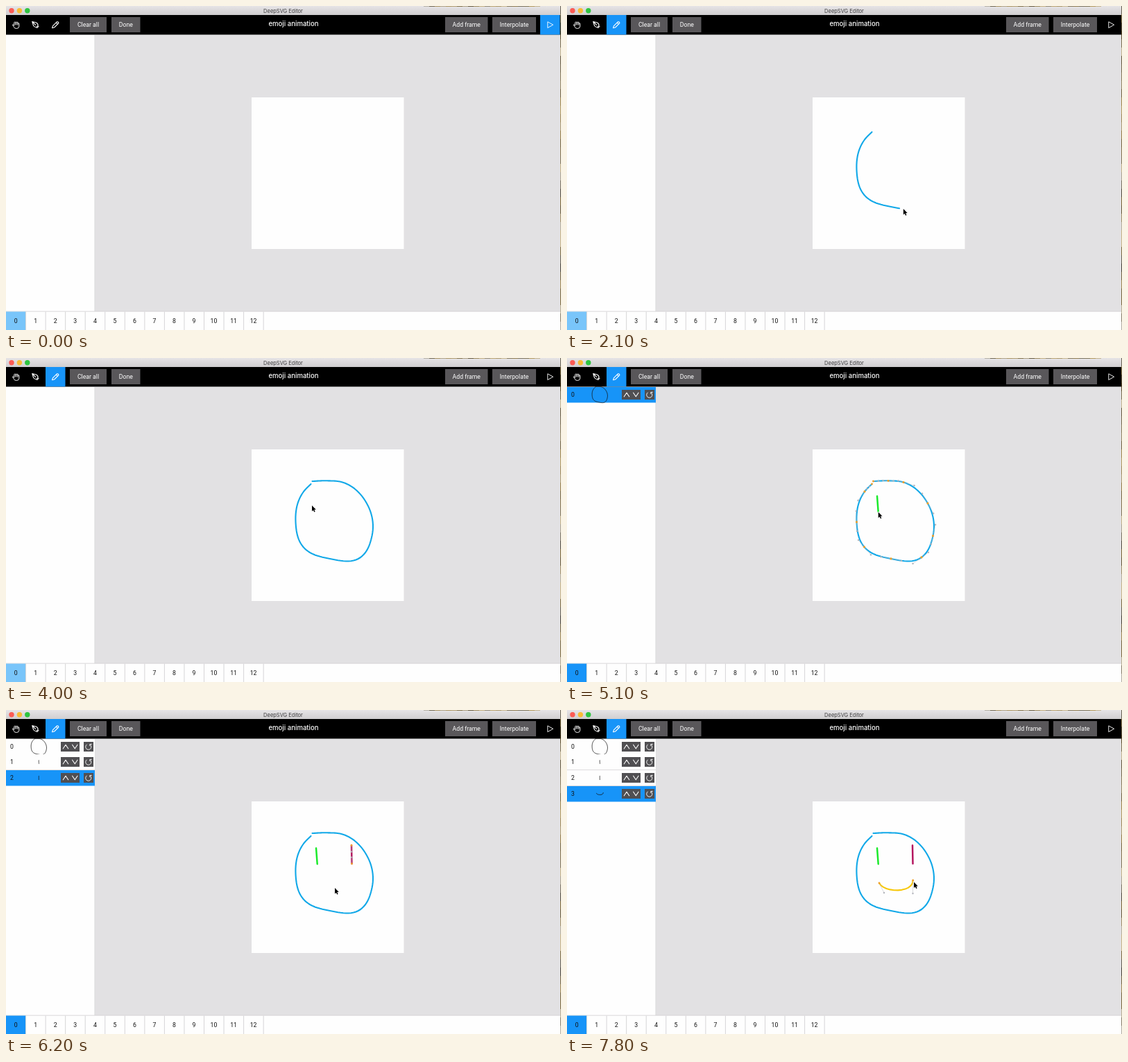
An HTML page with a canvas that plays this animation: 800x468 px, repeating every 8 s.

```html
<!DOCTYPE html>
<html lang="en">
<head>
<meta charset="utf-8">
<title>DeepSVG Editor</title>
<style>
html, body { margin: 0; width: 100%; height: 100%; overflow: hidden; background: #e2e1e3; }
canvas { display: block; width: 800px; height: 468px; }
</style>
</head>
<body>
<canvas id="stage"></canvas>
<script>
const LOOP = 8000, STEP = 100, LAST = 7800;
const BLUE = '#1794f8', ORANGE = '#f0a02c', HANDLE = '#b3b5bb', PAPER = '#fefefe', RULE = '#d6d5d7';
const UI = '8.7px Roboto, sans-serif';
const canvas = document.getElementById('stage');
const c = canvas.getContext('2d');
const dpr = window.devicePixelRatio || 1;
canvas.width = 800 * dpr;
canvas.height = 468 * dpr;

const mix = (p, q, f) => p.map((v, k) => v + (q[k] - v) * f);
const dist = (p, q) => Math.hypot(q[0] - p[0], q[1] - p[1]);
const clamp = f => Math.min(1, Math.max(0, f));

// Cubic segments through points; the nearer neighbour steers the tangent more
function spline(pts) {
  const dir = pts.map((p, i) => {
    const a = pts[i - 1] || p, b = pts[i + 1] || p;
    const la = dist(a, p) || 1, lb = dist(p, b) || 1;
    const v = [0, 1].map(k => (p[k] - a[k]) / la * lb + (b[k] - p[k]) / lb * la);
    return v.map(n => n / Math.hypot(...v));
  });
  return pts.slice(1).map((q, i) => {
    const p = pts[i], k = dist(p, q) * 0.35;
    return [p, p.map((v, n) => v + dir[i][n] * k), q.map((v, n) => v - dir[i + 1][n] * k), q];
  });
}

function sample(segs) {
  const out = [segs[0][0]];
  for (const [p, a, b, q] of segs) {
    for (let i = 1; i <= 12; i++) {
      const t = i / 12, m = mix(a, b, t);
      out.push(mix(mix(mix(p, a, t), m, t), mix(m, mix(b, q, t), t), t));
    }
  }
  return out;
}

// Leading part of a polyline, by share of its length
function part(pts, share) {
  const len = pts.slice(1).map((p, i) => dist(pts[i], p));
  let left = clamp(share) * len.reduce((a, b) => a + b, 0);
  const out = [pts[0]];
  for (let i = 0; i < len.length && left > 0; i++) {
    out.push(mix(pts[i], pts[i + 1], Math.min(1, left / len[i])));
    left -= len[i];
  }
  return out;
}

const face = spline([
  [439.5, 182], [429, 193], [417.5, 237], [428.5, 273], [467, 290], [511, 288],
  [527.5, 257], [520, 210], [485, 179.5], [463, 177.3], [441.5, 178]]);
const smile = [[[450, 250], [457, 264], [498.5, 265], [498.7, 246]]];

// Strokes are drawn from start to end and join the list when done
const shapes = [
  { segs: face, color: '#11a8e8', width: 2.1, start: 1500, end: 3300, done: 4400, ease: 1.37 },
  { segs: spline([[447, 199.5], [448.7, 222.5]]), color: '#1bea2b', width: 2.5, start: 4800, end: 5100, done: 5500, ease: 1 },
  { segs: spline([[498, 195.5], [498.5, 222]]), color: '#b4165f', width: 2.5, start: 5600, end: 5900, done: 6100, ease: 1 },
  { segs: smile, color: '#f7c80c', width: 2.1, start: 6600, end: 7300, done: 7500, ease: 1 }
];
for (const s of shapes) {
  s.pts = sample(s.segs);
  s.share = t => 1 - Math.pow(1 - clamp((t - s.start) / (s.end - s.start)), s.ease);
  s.mid = [0, 1].map(k => {
    const v = s.pts.map(p => p[k]);
    return (Math.min(...v) + Math.max(...v)) / 2;
  });
}

// Pointer rests between strokes: time and place
const stops = [[300, [74, 29]], [700, [483, 187]], [4000, [441, 213]], [6200, [474, 257]], [LAST, [500, 248.5]]];
for (const s of shapes) stops.push([s.start, s.pts[0]], [s.end, s.pts[s.pts.length - 1]]);
stops.sort((a, b) => a[0] - b[0]);

function pointer(t) {
  const pen = shapes.find(s => t >= s.start && t <= s.end);
  if (pen) return part(pen.pts, pen.share(t) + .016).pop();
  const i = stops.findIndex(s => s[0] >= t), [t1, q] = stops[i];
  if (!i) return q;
  const [t0, p] = stops[i - 1];
  return mix(p, q, (t - t0) / (t1 - t0));
}

function rect(x, y, w, h, color) {
  c.fillStyle = color;
  c.fillRect(x, y, w, h);
}

function dot([x, y], r, color) {
  c.fillStyle = color;
  c.beginPath();
  c.arc(x, y, r, 0, 7);
  c.fill();
}

function text(s, x, y, font, color, align = 'center') {
  c.font = font;
  c.fillStyle = color;
  c.textAlign = align;
  c.fillText(s, x, y);
}

function line(pts, color, width) {
  c.strokeStyle = color;
  c.lineWidth = width;
  c.beginPath();
  pts.forEach(p => c.lineTo(p[0], p[1]));
  c.stroke();
}

function icon(d, x, y, width = 1, color = '#fff', fill) {
  const p = new Path2D(d);
  c.save();
  c.translate(x, y);
  c.strokeStyle = color;
  c.lineWidth = width;
  c.stroke(p);
  if (fill) { c.fillStyle = fill; c.fill(p); }
  c.restore();
}

function button(label, x, w) {
  rect(x, 16, w, 22, '#59575a');
  text(label, x + w / 2, 30.3, UI, '#fff');
}

// Slivers of the desktop behind the window
function desktop() {
  let seed = 7;
  const rnd = () => (seed = seed * 16807 % 2147483647) / 2147483647;
  const tone = () => `hsl(42 ${10 + rnd() * 30}% ${25 + rnd() * 45}%)`;
  for (let x = 602; x < 770; x += 8) rect(x, 0, 8, .9, tone());
  for (let y = 0; y < 468; y += 12) rect(799, y, 1, 12, tone());
}

function titleBar() {
  const g = c.createLinearGradient(0, 0, 0, 13);
  g.addColorStop(0, '#e6e4e6');
  g.addColorStop(1, '#d0ced0');
  rect(0, 0, 800, 13, g);
  ['#fb5b54', '#f9bb34', '#2fc440'].forEach((color, i) => dot([8 + 11.4 * i, 6.8], 3.7, color));
  text('DeepSVG Editor', 399.5, 9.6, '7.5px Inter, sans-serif', '#3c3b3d');
}

function toolBar(t) {
  rect(0, 13, 799, 28.4, '#000');
  rect(t < 300 ? 770 : 57, 13, 28.5, 28.4, BLUE);
  button('Clear all', 92, 53);
  button('Done', 152, 41.5);
  button('Add frame', 633, 61.5);
  button('Interpolate', 701, 63);
  text('emoji animation', 414.5, 29.3, '500 9.6px Inter, sans-serif', '#fff');
  icon('M-2.7 1V-3.2q.9-1.4 1.8 0q.9-2 1.8 0q.9-1.4 1.8 0V-1.8q.9-1 1.8 0V2Q4.5 5.5.8 5.5T-3 3.2L-5.2.2Q-4.8-1-2.7 1M-.9-3V0M.9-3V0M2.7-2V.4', 14.4, 27, .9);
  icon('M-4.8-4.8L1.5-3Q4-1 3.3 1.4L1.2 3.4Q-1.2 3.4-3 1.2ZL0 0M2 4.3L4.4 2', 42.6, 27.3, 1.1);
  icon('M-4.6 4.6L-3.8 1.6L2.4-4.5Q4.8-4.5 4.6-2.3L-1.6 3.8ZM1-3L3-1', 71.2, 27.2, 1.1);
  icon('M-3.3-4.2L4.2 0L-3.3 4.2Z', 784.4, 27.2, .9);
}

function panels(t) {
  rect(0, 42, 128, 399, PAPER);
  rect(127.5, 42, .7, 399, RULE);
  rect(354, 132, 219.5, 219, PAPER);
  rect(0, 441, 800, 27, PAPER);
  rect(0, 440.7, 800, .8, '#cfced0');
  rect(0, 441.5, 28.5, 27, t < 4400 ? '#79c5fa' : BLUE);
  for (let i = 0; i < 13; i++) {
    rect(28.55 * (i + 1) - .5, 441.5, 1, 27, RULE);
    text(i, 14.2 + 28.53 * i, 458.2, UI, '#111');
  }
}

function row(s, i, active) {
  const y = Math.round(41.6 + 22.8 * i), my = y + 11;
  rect(0, y, 128, 22.5, active ? BLUE : PAPER);
  if (!active) rect(0, y + 22, 128, .8, RULE);
  text(i, 6, my + 3.1, UI, '#111', 'left');
  line(s.pts.map(p => [47.3 + (p[0] - s.mid[0]) * .2, my + (p[1] - s.mid[1]) * .2]), '#161616', .8);
  rect(79, my - 7, 27, 14, '#504f52');
  rect(112, my - 7, 14, 14, '#504f52');
  icon('M-3.7 2.8L0-2.8L3.7 2.8M9.6-2.8L13.3 2.8L17-2.8', 86, my, 1.1);
  icon('M-2.6-3.2A4.1 4.1 0 1 0 2.8-3M4.6-3.8H2V-1.4', 118.8, my + .2, .9);
}

function handles(segs) {
  for (const [p, a, b, q] of segs) {
    line([p, a], HANDLE, .5);
    line([q, b], HANDLE, .5);
    [a, b].forEach(h => dot(h, 1.2, HANDLE));
    [p, q].forEach(e => dot(e, 1.4, ORANGE));
  }
}

function draw(t) {
  c.setTransform(dpr, 0, 0, dpr, 0, 0);
  c.lineCap = c.lineJoin = 'round';
  rect(0, 0, 800, 468, '#e2e1e3');
  titleBar();
  toolBar(t);
  panels(t);
  desktop();
  const active = shapes.filter(s => t >= s.done).length - 1;
  shapes.forEach((s, i) => {
    if (t > s.start) line(part(s.pts, s.share(t)), s.color, s.width);
    if (i <= active) row(s, i, i === active);
    if (i === active) handles(s.segs);
  });
  if (t >= 300) icon('M0 0V8.4L1.9 6.7L3.2 9.6L4.6 9L3.3 6.1L5.8 6Z', ...pointer(t), 1.3, '#fff', '#000');
}

function tick() {
  const t = performance.now() % LOOP;
  draw(Math.min(Math.floor(t / STEP) * STEP, LAST));
  requestAnimationFrame(tick);
}
tick();
</script>
</body>
</html>
```
